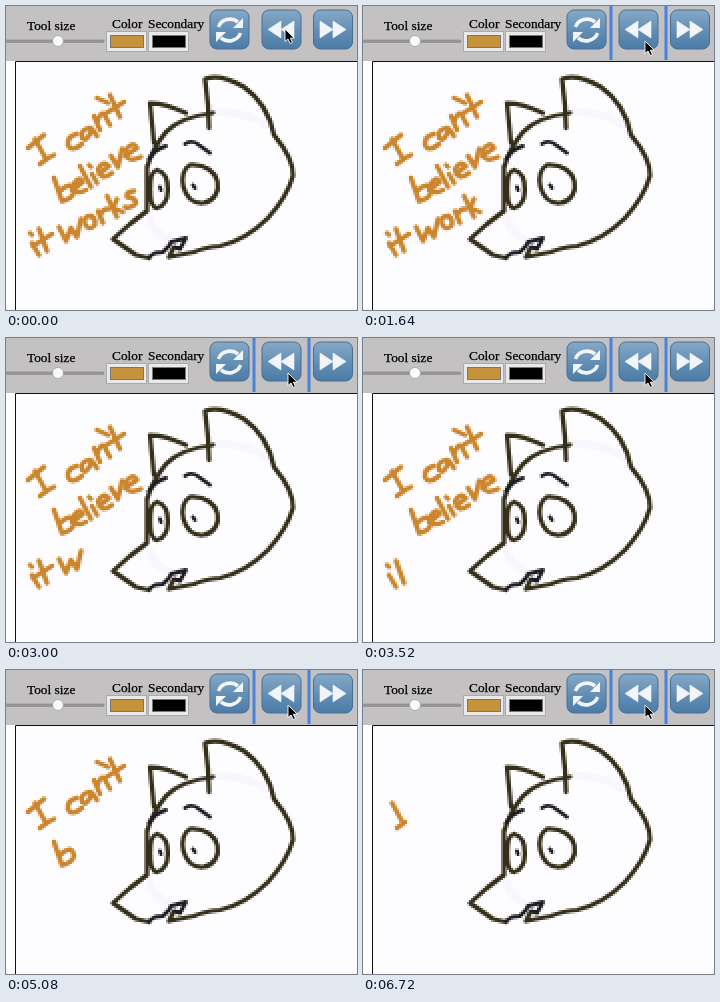
Write an HTML page with a canvas that moves like this. It is 351x304 px and loops after 7 s.

```html
<!DOCTYPE html>
<html lang="en">
<head>
<meta charset="utf-8">
<title>Undo</title>
<style>
  html, body { margin: 0; width: 100%; height: 100%; overflow: hidden; background: #fff; }
  canvas, svg { position: absolute; left: 0; top: 0; display: block; }
  canvas { width: 352px; height: 304px; image-rendering: pixelated; }
  text { font: 13.333px "Liberation Serif", "Times New Roman", serif; stroke: #000; stroke-width: .25px; }
</style>
</head>
<body>
<canvas id="paper" width="176" height="152"></canvas>
<svg width="351" height="304" viewBox="0 0 351 304">
  <defs>
    <linearGradient id="blue" x2="0" y2="1">
      <stop stop-color="#86a8c6"/><stop offset=".5" stop-color="#6590b6"/><stop offset="1" stop-color="#4b7ba5"/>
    </linearGradient>
    <rect id="button" y="4" width="39" height="39" rx="7" fill="url(#blue)" stroke="#466f94"/>
    <path id="rewind" d="M6 23.5L19 15V32ZM19 23.5L32 15V32Z" fill="#f1f5f9" stroke="#f1f5f9" stroke-width=".6"/>
    <g id="well">
      <rect x=".5" y="25.5" width="40" height="20" fill="#e9e9e9" stroke="#aaa"/>
      <rect x="4.5" y="29.5" width="33" height="12" stroke="#777"/>
    </g>
  </defs>
  <path d="M0 0H351V55H0Z" fill="#c3c1c2"/>
  <path d="M351 55.5H9.5V304" fill="none" stroke="#111"/>
  <text x="21" y="24">Tool size</text>
  <text x="106" y="22">Color</text>
  <text x="142" y="22">Secondary</text>
  <rect x="-4" y="34" width="102" height="2.4" rx="1.2" fill="#9a9899" stroke="#858384" stroke-width=".6"/>
  <circle cx="52" cy="35" r="5.5" fill="#fafafa" stroke="#999" stroke-width=".7"/>
  <use href="#well" x="100" fill="#c6933b"/>
  <use href="#well" x="142" fill="#000"/>
  <path id="focus" d="M248 0V54M303 0V54" stroke="#4b83dc" stroke-width="3"/>
  <use href="#button" x="204"/>
  <use href="#button" x="256"/>
  <use href="#button" x="307.5"/>
  <g fill="none" stroke="#f1f5f9" stroke-width="3.6">
    <path d="M212.5 21A12 11 0 0 1 232 16M234.5 27A12 11 0 0 1 215 32"/>
    <path d="M237 12V22H227ZM210 36V26H220Z" fill="#f1f5f9" stroke="none"/>
  </g>
  <use href="#rewind" x="256"/>
  <use href="#rewind" transform="translate(346 0) scale(-1 1)"/>
  <path id="pointer" d="M0 0V12.5L3 10L5.2 14.5L7.5 13.4L5.3 9.2H9.3Z" fill="#000" stroke="#fff" stroke-width=".9"/>
</svg>
<script>
const LOOP = 7000;
const ctx = paper.getContext('2d');

const faint = 'M212 106Q245 106 265 122M144 214Q148 226 162 234';
const head = [
  'M148 137L144 97Q160 97 180 107',
  'M141 162Q146 143 160 126Q174 111 207 107',
  'M203 122L202 99L199 73Q214 67 238 81Q262 98 268 129Q288 153 287 170',
  'Q281 191 262 212Q240 234 214 240Q196 242 188 246L163 251L167 243',
  'M141 160V205L124 218L107 233L130 249L143 252',
  'M151 164C142 164 142 202 151 202C165 200 166 168 151 164',
  'M184 159C171 165 175 198 197 197C220 193 217 157 184 159'
].join('');
const ink = [
  'M143 153Q149 143 160 140M179 138Q186 133 193 139L204 147',
  'M143 251L149 247L157 246L163 240L165 236L180 232L174 243L168 241',
  'M154 181L155 184M187 179L189 182'
].join('');

// Handwriting: [time of undo, pen stroke]
const works = [
  [3120, 'M53 221L60 235L65 222L71 231L75 213'],
  [2720, 'M86 210Q77 209 79 218Q83 226 89 219Q90 211 84 210'],
  [2400, 'M92 205L97 217M94 211Q96 202 103 203'],
  [2080, 'M101 190L111 211'],
  [1840, 'M111 193L107 202L117 206'],
  [1560, 'M128 185Q119 186 121 191Q130 192 130 197Q126 203 119 201']
];
const it = [
  [3920, 'M26 237L33 249'],
  [3760, 'M24 227L26 229'],
  [3560, 'M33 223L41 245'],
  [3320, 'M27 240L46 228']
];
const believe = [
  [5200, 'M48 172L56 195M55 184Q66 174 68 186Q66 193 57 195'],
  [4920, 'M66 184L77 176Q73 169 67 179Q68 190 80 184'],
  [4800, 'M74 160L85 181'],
  [4680, 'M86 168L91 177'],
  [4600, 'M83 159L85 161'],
  [4480, 'M93 168L103 160Q97 154 92 163Q95 176 106 167'],
  [4360, 'M105 150L112 161L116 143'],
  [4120, 'M119 150L131 142Q126 134 119 145Q120 158 135 151']
];
const cant = [
  [6360, 'M71 128Q61 130 62 139Q65 147 76 138'],
  [6160, 'M84 122Q74 123 76 132Q81 137 86 123L91 130'],
  [5960, 'M88 110L94 124M91 117Q94 106 98 108L104 119'],
  [5720, 'M104 89L114 111'],
  [5520, 'M99 108L118 96'],
  [5360, 'M91 92L102 97']
];
const capital = [
  [LOOP, 'M29 133L40 153M34 158L42 152'],
  [6720, 'M42 152L48 149'],
  [6520, 'M22 142L38 129']
];
const writing = [capital, cant, believe, it, works].flat()
  .map(([end, d]) => [end, new Path2D(d)]);

function stroke(path, color, width) {
  ctx.strokeStyle = color;
  ctx.lineWidth = width;
  ctx.stroke(typeof path === 'string' ? new Path2D(path) : path);
}

// Pointer keys: time, x, y
const keys = [[0, 279, 23], [80, 279, 23], [720, 282.5, 40], [1000, 282.5, 40], [1480, 282, 35], [LOOP, 282, 35]];

function movePointer(t) {
  const i = keys.findIndex(k => k[0] > t);
  const [a, b] = [keys[i - 1], keys[i]];
  const u = (t - a[0]) / (b[0] - a[0]);
  const s = u * u * (3 - 2 * u);
  pointer.setAttribute('transform',
    `translate(${a[1] + (b[1] - a[1]) * s} ${a[2] + (b[2] - a[2]) * s})`);
}

const focusRing = document.getElementById('focus');

function draw() {
  const t = performance.now() % LOOP;
  ctx.setTransform(.5, 0, 0, .5, 0, 0);
  ctx.fillStyle = '#fff';
  ctx.fillRect(0, 0, 352, 304);
  ctx.fillStyle = '#fdfcfe';
  ctx.fillRect(10, 55, 342, 249);
  ctx.lineJoin = ctx.lineCap = 'round';
  stroke(faint, '#f9f7fd', 8);
  stroke(head, '#352e18', 4.5);
  stroke(ink, '#1d1d22', 3.8);
  for (const [end, path] of writing) if (t < end) stroke(path, '#cb852c', 4.8);
  focusRing.style.visibility = t < 1520 ? 'hidden' : 'visible';
  movePointer(t);
  requestAnimationFrame(draw);
}
draw();
</script>
</body>
</html>
```
